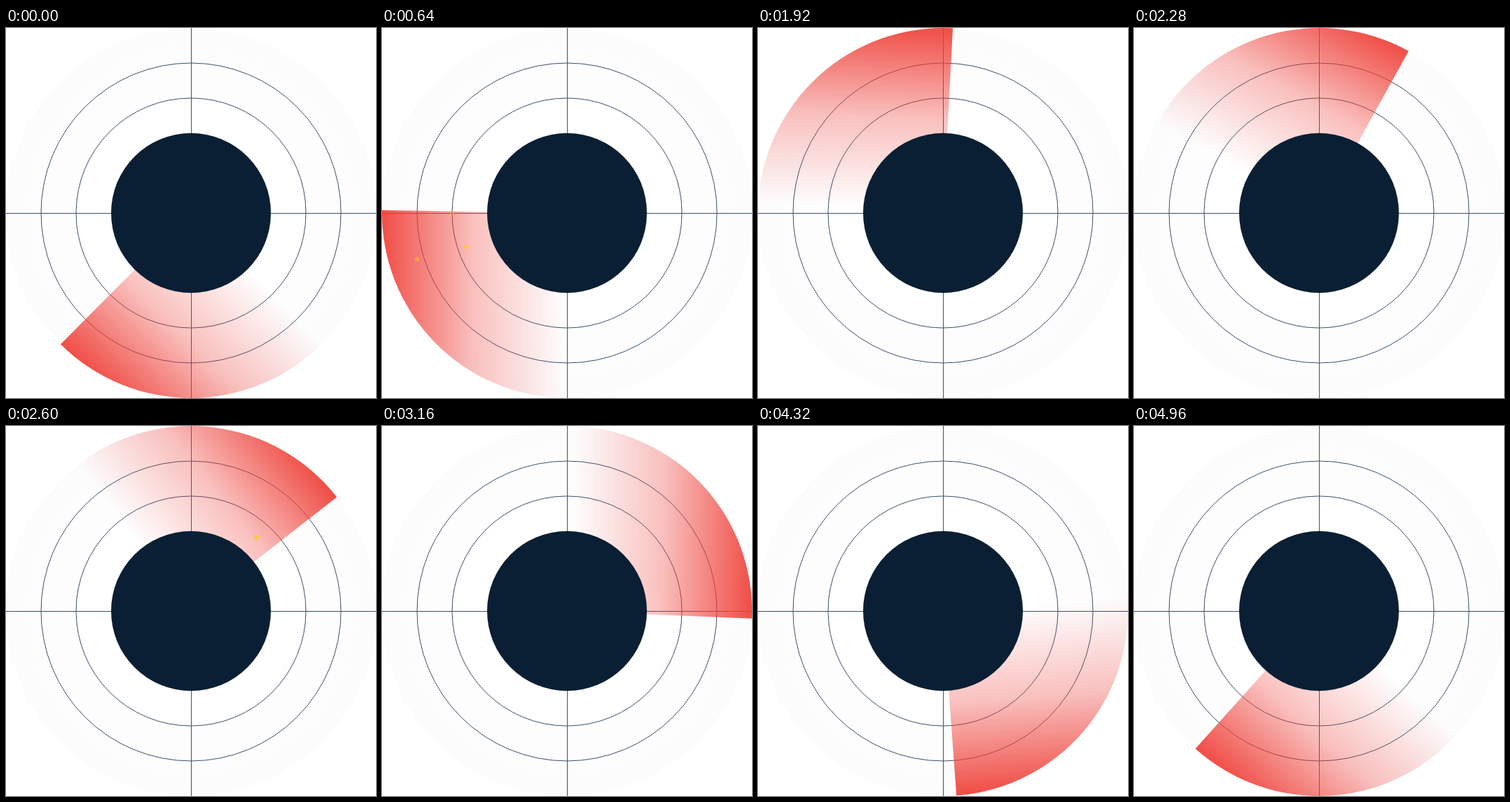
Recreate the animation shown at these times as an HTML page with a canvas. Size 528 px wide and 528 px high, loop 5000 ms.

```html
<!DOCTYPE html>
<html lang="en">
<head>
<meta charset="utf-8">
<title>Radar sweep</title>
<style>
  html, body { margin: 0; width: 100%; height: 100%; overflow: hidden; background: #fff; }
  canvas { display: block; }
</style>
</head>
<body>
<canvas id="stage" width="528" height="528"></canvas>
<script>
const ctx = document.getElementById('stage').getContext('2d');
const LOOP = 5000, STEP = 40, CENTER = 264, BLIP_LIFE = 700, START_ANGLE = 134.8;

// x, y, time of appearance in ms
const blips = [
  [120.5, 312.5, 310],
  [50, 330, 520],
  [100, 264, 570],
  [64, 217.5, 900],
  [357.5, 159, 2300]
];

function disc(x, y, r, fill) {
  ctx.beginPath();
  ctx.arc(x, y, r, 0, Math.PI * 2);
  ctx.fillStyle = fill;
  ctx.fill();
}

function drawGrid() {
  const haze = ctx.createRadialGradient(CENTER, CENTER, 114, CENTER, CENTER, 264);
  haze.addColorStop(0, '#fff');
  haze.addColorStop(1, '#fcfcfd');
  disc(CENTER, CENTER, 264, haze);

  ctx.strokeStyle = '#3d5069';
  ctx.lineWidth = 1;
  for (const r of [164, 214]) {
    ctx.beginPath();
    ctx.arc(CENTER, CENTER, r, 0, Math.PI * 2);
    ctx.stroke();
  }
  ctx.beginPath();
  ctx.moveTo(0, 264.5);
  ctx.lineTo(528, 264.5);
  ctx.moveTo(264.5, 0);
  ctx.lineTo(264.5, 528);
  ctx.stroke();
}

// Quarter disc whose colour fades along its leading edge
function drawSweep(angle) {
  ctx.save();
  ctx.translate(CENTER, CENTER);
  ctx.rotate(angle);
  const fade = ctx.createLinearGradient(0, 0, 264, 0);
  fade.addColorStop(0, 'rgba(239, 62, 54, 0)');
  fade.addColorStop(0.5, 'rgba(239, 62, 54, 0.32)');
  fade.addColorStop(1, 'rgba(239, 62, 54, 0.92)');
  ctx.beginPath();
  ctx.moveTo(0, 0);
  ctx.arc(0, 0, 264, -Math.PI / 2, 0);
  ctx.closePath();
  ctx.fillStyle = fade;
  ctx.fill();
  ctx.restore();
}

function drawBlips(time) {
  for (const [x, y, start] of blips) {
    const age = (time - start) / BLIP_LIFE;
    if (age <= 0 || age >= 1) continue;
    ctx.globalAlpha = Math.sin(Math.PI * age);
    disc(x, y, 3, '#ffcb20');
  }
  ctx.globalAlpha = 1;
}

function draw(now) {
  const time = Math.floor((now % LOOP) / STEP) * STEP;
  ctx.clearRect(0, 0, 528, 528);
  drawGrid();
  drawSweep((START_ANGLE + 360 * time / LOOP) * Math.PI / 180);
  drawBlips(time);
  disc(CENTER, CENTER, 114, '#0a1f33');
}

function tick() {
  draw(performance.now());
  requestAnimationFrame(tick);
}
tick();
</script>
</body>
</html>
```
